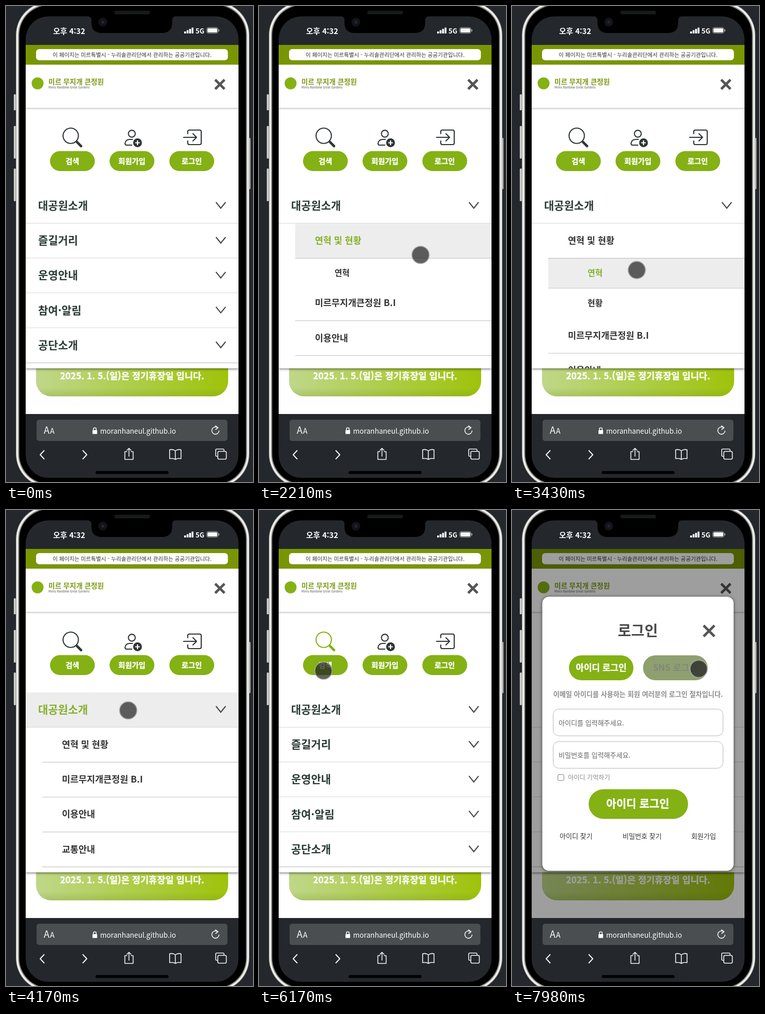
Write an HTML page that moves like this. It is 477 px wide and 917 px high and loops after 8 s.

```html
<!DOCTYPE html>
<html lang="ko">
<head>
<meta charset="utf-8">
<style>
html, body { margin: 0; width: 100%; height: 100%; overflow: hidden; background: #24282d; }
svg { display: block; width: 477px; height: 917px; font-family: "Noto Sans CJK KR", "Noto Sans CJK", "Noto Sans", sans-serif; }
.b { font-weight: 700; }
.m { text-anchor: middle; }
.heavy { font-weight: 700; stroke: #fff; stroke-width: .35; }
.ink { fill: none; stroke: #2e3436; stroke-width: 2.1; stroke-linecap: round; stroke-linejoin: round; }
.nav { fill: none; stroke: #f2f2f2; stroke-width: 1.6; stroke-linejoin: round; }
.cross { stroke: #555; stroke-width: 4.8; }
.row rect { fill: #fff; }
.row.on rect { fill: #ededed; }
.row.on text { fill: #84b02a; }
.icon.on .ink { stroke: #84b114; }
.icon.on .badge { fill: #84b114; }
</style>
</head>
<body>
<svg id="stage" viewBox="0 0 477 917"></svg>
<script>
const GREEN = '#84b114', DARK = '#24282d';
const stage = document.getElementById('stage');

const text = (x, y, size, str, fill = '#333', cls = 'b') =>
  `<text x="${x}" y="${y}" font-size="${size}" fill="${fill}" class="${cls}">${str}</text>`;
const box = (x, y, w, h, fill, r = 0, extra = '') =>
  `<rect x="${x}" y="${y}" width="${w}" height="${h}" rx="${r}" fill="${fill}" ${extra}/>`;
const path = (d, cls, extra = '') => `<path d="${d}" class="${cls}" ${extra}/>`;
const cross = (x, y, r) => path(`M${x - r} ${y - r}l${2 * r} ${2 * r}m0 ${-2 * r}l${-2 * r} ${2 * r}`, 'cross');
const line = (x, y) => box(x, y, 449 - x, 1.3, '#c6c6c6');
const row = (id, x, y, h, tx, ty, size, str, fill, rule = true) =>
  `<g class="row" id="${id}">${box(x, y, 449 - x, h, '#fff')}${text(tx, ty, size, str, fill)}</g>` + (rule ? line(x, y + h) : '');
// Nested layers of the phone body, inset from its outer edge
const shell = (inset, fill) => box(19 + inset, -8 + inset, 451 - 2 * inset, 935 - 2 * inset, fill, 64 - inset);

const phone = `
  <defs>
    <linearGradient id="lime"><stop offset="0" stop-color="#bfd789"/><stop offset=".45" stop-color="#b0ce50"/>
      <stop offset="1" stop-color="#9fc30a"/></linearGradient>
    <linearGradient id="edge" x2="0" y2="1"><stop offset=".85" stop-color="#6d8c20" stop-opacity="0"/>
      <stop offset="1" stop-color="#6d8c20" stop-opacity=".25"/></linearGradient>
    <clipPath id="menuClip"><rect x="38" y="113" width="411" height="585"/></clipPath>
  </defs>
  ${box(0, 0, 477, 917, DARK)}
  ${[[15, 170, 31], [15, 231, 63], [15, 313, 63], [468, 254, 99]].map(([x, y, h]) => box(x, y, 4, h, '#c9c9c6', 1.5)).join('')}
  ${shell(0, '#8d8d8b')}${shell(1, '#f1f0ec')}${shell(4.5, '#8a8a88')}${shell(6.5, '#000')}
  ${box(38, 20, 411, 889, DARK, 44)}
  <path d="M158 20q7 0 7 8v4q0 20 20 20h116q20 0 20-20v-4q0-8 7-8z"/>
  ${box(209, 9, 69, 7, '#17191b', 3.5)}
  <circle cx="187" cy="31" r="8.5" fill="#121419"/><circle cx="187" cy="31" r="3" fill="#22262e"/>
  ${text(91, 54, 14.7, '오후 4:32', '#fff')}
  ${[0, 1, 2, 3].map(i => box(344 + i * 4.8, 49 - i * 2.5, 3.6, 4 + i * 2.5, '#fff', 1)).join('')}
  ${text(366, 53, 13, '5G', '#fff')}
  ${box(387.5, 41.5, 22, 11, 'none', 3.5, 'stroke="#aaa"')}${box(389, 43, 19, 8, '#fff', 2)}${box(410.5, 45, 1.5, 4, '#aaa')}`;

const page = `
  ${box(38, 75, 411, 711, '#fff')}
  ${box(38, 75, 411, 38, '#7a9504')}
  ${box(58, 83, 370.5, 21.5, '#fff', 6)}
  ${text(243.5, 98, 10.6, '이 페이지는 미르특별시 - 누리솔관리단에서 관리하는 공공기관입니다.', '#333', 'm')}
  ${box(58, 640, 371, 112, 'url(#lime)', 29)}${box(58, 640, 371, 112, 'url(#edge)', 29)}
  ${text(243.5, 719, 17.5, '2025. 1. 5.(일)은 정기휴장일 입니다.', '#fff', 'heavy m')}
  ${box(38, 600, 411, 98, '#fff', 0, 'style="filter:drop-shadow(0 2px 2px rgba(0,0,0,.45))"')}
  ${box(38, 113, 411, 585, '#fff')}
  <circle cx="61" cy="149" r="11.5" fill="${GREEN}"/>
  ${text(82, 151, 13.5, '미르 무지개 큰정원', '#7a9a12')}
  ${text(82, 159, 5.7, 'Mireu Rainbow Great Gardens', '#555', '')}
  ${cross(413, 151, 9)}
  ${box(38, 196, 411, 3, '#dcdcdc')}`;

const shortcuts = `
  <g class="icon" id="search"><circle cx="125" cy="250" r="14.8" class="ink"/>${path('M137 262l8 8', 'ink', 'style="stroke-width:4.6"')}</g>
  <g class="icon" id="join"><circle cx="243" cy="246" r="6.6" class="ink"/>
    ${path('M243 268h-10q-3.5 0-3-4q1.5-7 9-7h5', 'ink')}
    <circle cx="254" cy="263.5" r="8.5" fill="#2e3436" class="badge"/>
    ${path('M249.5 263.5h9m-4.5-4.5v9', '', 'stroke="#fff" stroke-width="2.2"')}</g>
  <g class="icon" id="login">${path('M351 246v-4q0-3 3-3h20q3 0 3 3v22q0 3-3 3h-20q-3 0-3-3v-4M343 253h25m-7-7l7 7l-7 7', 'ink')}</g>
  ${[[85, '검색'], [200, '회원가입'], [315.5, '로그인']].map(([x, s]) =>
    box(x, 279.5, 86.5, 38.5, GREEN, 19.25) + text(x + 43.2, 304, 14.2, s, '#fff', 'heavy m')).join('')}`;

const menu = `<g clip-path="url(#menuClip)">
  ${['대공원소개', '즐길거리', '운영안내', '참여·알림', '공단소개'].map((s, i) => {
    const y = 351.5 + i * 67.2;
    return row('main' + i, 38, y, 66.5, 62, y + 40.5, 20.9, s, '#2a3a33') +
      path(`M405.5 ${y + 26.5}l9.3 11.5l9.3-11.5`, '', 'fill="none" stroke="#4a4a4a" stroke-width="2.2"');
  }).join('')}
  <g id="sub">
    ${box(38, 419.3, 411, 279, '#fff')}
    ${row('history', 70, 485.5, 57.5, 146, 520, 15.8, '연혁')}
    ${row('status', 70, 544.3, 58, 146, 578, 15.8, '현황', '#333', false)}
    <g id="rest">${box(38, 486.5, 411, 330, '#fff')}
      ${['미르무지개큰정원 B.I', '이용안내', '교통안내'].map((s, i) =>
        row('rest' + i, 70, 486.5 + i * 67.2, 66, 108, 525 + i * 67.4, 17.4, s)).join('')}
    </g>
    ${row('about', 70, 419.3, 66, 108, 458, 17.4, '연혁 및 현황')}
  </g></g>`;

const modal = `<g id="modal">
  ${box(38, 75, 411, 711, '#000', 0, 'opacity=".38"')}
  ${box(58.5, 167, 369.5, 528, '#fff', 13, 'style="filter:drop-shadow(0 1px 3px rgba(0,0,0,.6))"')}
  ${text(243, 243, 28, '로그인', '#4a4a4a', 'b m')}
  ${cross(380.5, 233, 10.5)}
  ${box(110, 280, 124.5, 48, GREEN, 24)}${text(172.2, 310, 16.9, '아이디 로그인', '#fff', 'heavy m')}
  ${box(253, 280, 125, 48, '#d0d0d0', 24, 'id="sns"')}${text(315, 310, 17, 'SNS 로그인', '#81887b', 'b m')}
  ${text(243.5, 360, 13.1, '이메일 아이디를 사용하는 회원 여러분의 로그인 절차입니다.', '#8c8c8c', 'b m')}
  ${[383, 445.5].map(y => box(79.5, y + .5, 328, 51.5, '#fff', 11, 'stroke="#b8b8b8"')).join('')}
  ${text(90, 414.5, 13, '아이디를 입력해주세요.', '#666', '')}
  ${text(90, 476.5, 13, '비밀번호를 입력해주세요.', '#666', '')}
  ${box(88.7, 509.7, 11.5, 11.5, '#fff', 2, 'stroke="#777"')}
  ${text(108, 519.5, 12.1, '아이디 기억하기', '#888', '')}
  ${box(148, 538, 192, 57, GREEN, 28.5)}${text(243, 573, 21, '아이디 로그인', '#fff', 'heavy m')}
  ${text(92, 632.5, 13, '아이디 찾기', '#333', '')}
  ${text(213.5, 632.5, 13, '비밀번호 찾기', '#333', '')}
  ${text(346, 632.5, 13, '회원가입', '#333', '')}
</g>`;

const browser = `
  ${box(59, 797, 368.5, 41, '#4b4e51', 5)}
  ${text(73, 824, 18, 'A', '#fff', '')}${text(85, 824, 14, 'A', '#fff', '')}
  ${box(167, 817, 9, 7.5, '#fff', 1)}${path('M168.8 817v-2q0-2.5 2.7-2.5t2.7 2.5v2', 'nav')}
  ${text(255, 823.5, 13.6, 'moranhaneul.github.io', '#fff', 'm')}
  ${path('M409 812.5a7 7 0 1 0 2.5 5.5M404 808.5l5.5 4l-5 3.5', 'nav')}
  ${path('M74 856l-8 8.5l8 8.5M148 856l8 8.5l-8 8.5', 'nav', 'style="stroke-width:2"')}
  ${path('M234 858.5h-4.5v15h16v-15h-4.5M237.5 868v-16m-4.5 4.5l4.5-4.5l4.5 4.5', 'nav')}
  ${path('M327 857q-5-4-11-2v17q6-1.5 11 1.5q5-3 11-1.5v-17q-6-2-11 2v16', 'nav')}
  ${path('M409 867.5h-2q-2 0-2-2v-10q0-2 2-2h12q2 0 2 2v2', 'nav')}
  ${box(409, 858, 16.5, 15, DARK, 2.5, 'class="nav"')}
  ${box(173, 896, 141, 5.5, '#000', 2.7)}`;

stage.innerHTML = phone + page + shortcuts + menu + modal + browser +
  '<circle id="pointer" r="16.7" fill="#1e1e1e" fill-opacity=".7" stroke="#aaa" stroke-opacity=".85" stroke-width="1.8"/>';

// Pointer path: time, x, y
const track = [
  [740, 420, 385], [810, 330, 385], [1410, 330, 385], [1480, 329.5, 384], [1610, 312, 479.5],
  [2610, 312, 479.5], [2680, 288, 484], [2750, 264, 518], [2890, 254, 560], [3100, 250, 595.5],
  [3290, 250, 595.5], [3430, 241, 509], [3500, 239, 480], [3700, 236, 460],
  [4030, 236, 460], [4170, 236, 386], [5100, 236, 386], [5440, 179, 327], [5840, 124.5, 300.5],
  [6030, 124.5, 300.5], [6170, 124.5, 309.5], [7160, 124.5, 309.5], [7230, 158, 308],
  [7400, 215, 343.5], [7520, 290, 338], [7770, 360.5, 306], [8000, 360.5, 306]
];

const $ = id => document.getElementById(id);
const swing = (t, a, b) => .5 - .5 * Math.cos(Math.PI * Math.min(1, Math.max(0, (t - a) / (b - a))));
const show = (id, on) => $(id).style.display = on ? '' : 'none';

function pointerAt(t) {
  const i = Math.max(1, track.findIndex(k => k[0] > t));
  const [a, b] = [track[i - 1], track[i]], p = (t - a[0]) / (b[0] - a[0]);
  return [a[1] + (b[1] - a[1]) * p, a[2] + (b[2] - a[2]) * p];
}

function draw() {
  const t = performance.now() % 8000;
  const [x, y] = pointerAt(t);
  const visible = t >= 740, open = t >= 1140 && t < 4630;
  const slide = swing(t, 1960, 2490) - swing(t, 3800, 4100);
  const hover = (id, on) => $(id).classList.toggle('on', visible && on);
  const within = (top, bottom) => y >= top && y < bottom;

  show('sub', open);
  show('modal', t >= 7910);
  show('pointer', visible);
  $('rest').setAttribute('transform', `translate(0 ${116 * slide})`);
  $('pointer').setAttribute('transform', `translate(${x} ${y})`);
  $('sns').setAttribute('fill', t >= 7980 ? '#8fa070' : '#b2baa6');

  hover('main0', within(351, 418.5));
  hover('about', open && within(418.5, 485.5));
  hover('history', open && within(485.5, 543));
  hover('status', open && within(543, 602));
  [['search', 85], ['join', 200], ['login', 315.5]].forEach(([id, left]) =>
    hover(id, within(234, 318) && x >= left && x < left + 86.5));
  requestAnimationFrame(draw);
}
draw();
</script>
</body>
</html>
```
